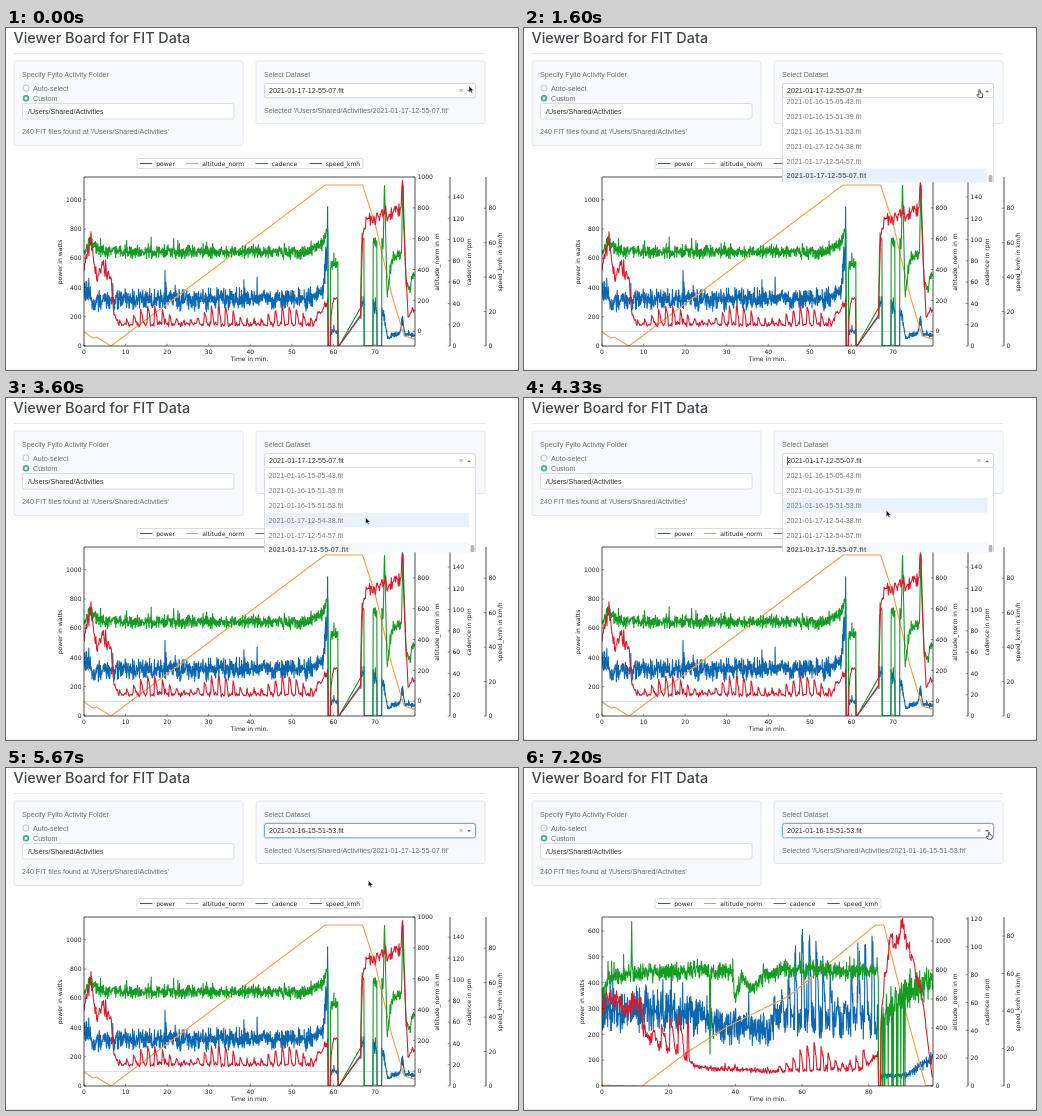
Write an HTML page that moves like this. It is 512x342 px and loops after 7270 ms.

```html
<!DOCTYPE html>
<html lang="en">
<head>
<meta charset="utf-8">
<title>Viewer Board</title>
<style>
html, body { margin: 0; width: 100%; height: 100%; overflow: hidden; background: #fff; }
svg { display: block; width: 512px; height: 342px; }
text { font: 7.12px "Liberation Sans", Arial, sans-serif; fill: #6b6f75; white-space: pre; }
.title { font: 500 14.4px Inter, sans-serif; fill: #43474c; }
.value { fill: #333; }
.plot text { font: 6.05px "DejaVu Sans", sans-serif; fill: #222; }
.mid { text-anchor: middle; }
.end { text-anchor: end; }
.row { fill: #7c7c7c; }
.picked { font-weight: bold; letter-spacing: .18px; fill: #686c70; }
</style>
</head>
<body>
<svg id="stage" viewBox="0 0 512 342"></svg>
<script>
const LOOP = 7270, OPEN = 1080, PICK = 4600, REDRAW = 6270;
const LEFT = 78, RIGHT = 409, TOP = 149, BASE = 318;
const COLORS = { power: '#0c67b0', altitude_norm: '#fb9b3c', cadence: '#149c23', speed_kmh: '#dc1a2b' };
const LABELS = ['power in watts', 'altitude_norm in m', 'cadence in rpm', 'speed_kmh in km/h'];
const OLD = '2021-01-17-12-55-07.fit', NEW = '2021-01-16-15-51-53.fit';
const FILES = ['2021-01-16-15-05-43.fit', '2021-01-16-15-51-39.fit', NEW,
  '2021-01-17-12-54-38.fit', '2021-01-17-12-54-57.fit', OLD];
const stage = document.getElementById('stage');

function el(tag, attrs, parent = stage, content) {
  const node = document.createElementNS('http://www.w3.org/2000/svg', tag);
  for (const key in attrs) node.setAttribute(key, attrs[key]);
  if (content !== undefined) node.textContent = content;
  return parent.appendChild(node);
}
const text = (x, y, content, cls = '', parent) => el('text', { x, y, class: cls }, parent, content);
const box = (x, y, width, height, fill, stroke = 'none', rx = 0, parent) =>
  el('rect', { x, y, width, height, fill, stroke, rx, 'stroke-width': .8 }, parent);
const line = (d, stroke, parent, width = .8) =>
  el('path', { d, stroke, fill: 'none', 'stroke-width': width, 'stroke-linejoin': 'round' }, parent);
const show = (node, on) => node.setAttribute('visibility', on ? 'visible' : 'hidden');
const within = (m, spans = []) => spans.some(([from, to]) => m >= from && m < to);

function random(seed) {
  return () => {
    seed = (seed + 0x6D2B79F5) | 0;
    let v = Math.imul(seed ^ seed >>> 15, 1 | seed);
    v = v + Math.imul(v ^ v >>> 7, 61 | v) ^ v;
    return ((v ^ v >>> 14) >>> 0) / 4294967296;
  };
}

// keys: "minute:value ..." joined by straight lines
function curve(keys) {
  const pts = keys.split(' ').map(k => k.split(':').map(Number));
  return m => {
    const i = Math.max(1, pts.findIndex(p => p[0] > m));
    const [m0, v0] = pts[i - 1], [m1, v1] = pts[i];
    return v0 + (v1 - v0) * (m - m0) / (m1 - m0);
  };
}

// Short efforts of uneven height, each fading over its width
function effort(m, { from, to, gap, width, height }) {
  const n = Math.floor((m - from) / gap), phase = (m - from) % gap;
  if (m < from || m > to || phase > width) return 0;
  return height * (.2 + .8 * Math.sin(n * 12.9) ** 2) * Math.sqrt(1 - phase / width);
}

// Scatter grows with the value; calm rescales it once the climb is over
function trace(ride, name, scale) {
  const { keys, noise = 0, calm = 1, step = .3, efforts = [], drops } = ride[name];
  const value = curve(keys), rnd = random(name.length * 7 + ride.minutes);
  const pedalled = name === 'power' || name === 'cadence';
  let d = '';
  for (let m = 0; m < ride.minutes; m += step / ride.pace) {
    if (within(m, ride.gaps)) continue;
    let v = value(m);
    if (noise) {
      const amp = v * noise * (m > ride.summit ? calm : 1);
      v += (rnd() + rnd() - 1) * amp * 1.25;
      if (rnd() < .025) v += amp * (.6 + 1.4 * rnd());
      for (const e of efforts) v += effort(m, e);
      const idle = pedalled && within(m, ride.coasts) || drops && within(m, [drops]) && rnd() < .1;
      if (idle || within(m, ride.stops)) v = 0;
    }
    const y = Math.min(BASE, scale.zero - v * scale.unit);
    d += `${d ? 'L' : 'M'}${(LEFT + m * ride.pace).toFixed(2)} ${y.toFixed(2)}`;
  }
  return d;
}

const axis = (step, max, unit, zero = BASE) => ({ step, max, unit, zero });

const longClimb = {
  pace: 4.157, minutes: 79.6, tick: 10, wattsX: 56, summit: 58.5,
  axes: [axis(200, 1000, .1463), axis(200, 1000, .1542, 303.2), axis(20, 140, 1.064), axis(20, 80, 1.722)],
  stops: [[58.7, 59.3], [61.1, 61.35]], gaps: [[61.35, 66.5]], coasts: [[67.4, 69.5], [70.5, 71.6]],
  power: { noise: .22,
    keys: '0:350 1:390 2:300 7:320 55:320 57.5:390 58.6:700 59.3:100 61:100 66.5:190 67:320 72:240 73:60 76:90 76.7:200 77.2:75 80:75' },
  altitude_norm: { keys: '0:-5 2.2:-45 3:-38 6.5:-96 58:948 67:948 70:700 74:240 77:-30 80:-57' },
  cadence: { noise: .065,
    keys: '0:90 1.2:97 4:89 54:88 57.5:96 58.6:112 59.3:78 61:77 66.5:26 66.8:100 72:97 72.3:152 72.9:45 74:80 76.4:88 76.7:152 77.5:60 78.5:52 79:68 80:64' },
  speed_kmh: { noise: .1, calm: .55, step: .7,
    efforts: [{ from: 8.5, to: 57, gap: 1.7, width: .6, height: 11 }],
    keys: '0:42 1.5:62 3:39 4.5:47 6.5:40 7.2:18 8.5:12.5 55:12.5 58.6:26 59.3:15 60:27 61.1:27 66.5:16 67:66 68:74 76:79 76.6:94 77.1:58 78:16 79:22 80:17' }
};
const intervals = {
  pace: 3.335, minutes: 99.2, tick: 20, wattsX: 60, summit: 83,
  axes: [axis(100, 600, .2583), axis(200, 1000, .145), axis(20, 120, 1.392), axis(20, 80, 1.875)],
  stops: [[82.9, 83.6]],
  power: { noise: .26,
    efforts: [{ from: 51.5, to: 82, gap: 2.1, width: .8, height: 360 }],
    keys: '0:285 12:295 28:280 33:240 50:215 52:255 83:255 83.6:40 91:40 100:115' },
  altitude_norm: { keys: '0:5 12:0 26:240 38:415 56:620 82:1110 84.5:1110 88.5:745 92:430 97:5 100:0' },
  cadence: { noise: .075, calm: 2.2, drops: [84, 91],
    keys: '0:66 2:78 8.7:81 8.9:116 9.1:81 32.2:83 32.4:18 32.6:82 39:82 40:64 42:79 45:70 48:78 54:84 82.9:82 83.6:45 90:66 100:74' },
  speed_kmh: { noise: .15, calm: .4, step: .5,
    efforts: [{ from: 12.5, to: 26, gap: 2.6, width: 1.6, height: 22 }, { from: 53, to: 80, gap: 2.1, width: .9, height: 15 }],
    keys: '0:40 2:48 6:42 12:42 12.5:26 20:19 26:14 28:10 50:8 78:9 83:17 84:44 86.5:80 88:75 90:85 93:68 96:48 99:5 100:0' }
};

function chart(ride) {
  const g = el('g', { class: 'plot' });
  const lines = el('g', { 'clip-path': 'url(#area)' }, g);
  const ground = ride.axes[1].zero;
  if (ground < BASE) line(`M${LEFT} ${ground + .3}H${RIGHT}`, '#fccb9c', lines);
  Object.keys(COLORS).forEach((name, i) => line(trace(ride, name, ride.axes[i]), COLORS[name], lines, 1.1));

  line(`M${LEFT} ${TOP}H${RIGHT}V${BASE}H${LEFT}ZM444 ${TOP}V${BASE}M480 ${TOP}V${BASE}`, '#222', g);
  for (let m = 0; m < ride.minutes - 1; m += ride.tick) {
    const x = LEFT + m * ride.pace;
    line(`M${x} ${BASE}v-2.2`, '#222', g, .5);
    text(x, 326, m, 'mid', g);
  }
  [LEFT, RIGHT, 444, 480].forEach((x, i) => {
    const { step, max, unit, zero } = ride.axes[i], side = i ? 1 : -1;
    for (let v = 0; v <= max; v += step) {
      const y = zero - v * unit;
      line(`M${x} ${y}h${-2.2 * side}`, '#222', g, .5);
      text(x + 2.5 * side, y + 2.2, v, i ? '' : 'end', g);
    }
  });
  [ride.wattsX, 432.5, 465, 496].forEach((x, i) =>
    el('text', { transform: `translate(${x} 234) rotate(-90)`, class: 'mid' }, g, LABELS[i]));
  text(243.5, 332.5, 'Time in min.', 'mid', g);
  return g;
}

// page
const defs = el('defs', {});
const clip = (id, x, y, width, height) => el('rect', { x, y, width, height }, el('clipPath', { id }, defs));
clip('area', LEFT, TOP, RIGHT - LEFT, BASE - TOP);
clip('window', 258, 70, 212, 84.3);
text(7.5, 15, 'Viewer Board for FIT Data', 'title');
line('M8 25.5H479', '#e2e4e7');
line('M0 341.5H512', '#ececee');
box(8, 33, 229, 84.5, '#f8f9fc', '#dfe2e9', 2);
box(250, 33, 229, 62.5, '#f8f9fc', '#dfe2e9', 2);
text(16, 49, 'Specify Fylto Activity Folder');
el('circle', { cx: 20, cy: 60, r: 3.1, fill: '#fff', stroke: '#a9adb2', 'stroke-width': .7 });
el('circle', { cx: 20, cy: 70.3, r: 2.4, fill: '#fff', stroke: '#45b08c', 'stroke-width': 1.8 });
text(27, 62.6, 'Auto-select');
text(27, 72.9, 'Custom');
box(16.5, 75.5, 211.5, 15.5, '#fff', '#d3d6dc', 2);
text(22, 86, '/Users/Shared/Activities', 'value');
text(16, 105.6, "240 FIT files found at '/Users/Shared/Activities'");
text(258, 49, 'Select Dataset');
const status = text(258, 85, '');

// chart
const charts = [chart(longClimb), chart(intervals)];
const legend = el('g', { class: 'plot' });
box(131, 130.5, 226, 10, '#fff', '#d4d4d4', 1.5, legend);
const slots = [134, 180, 249.5, 303.5];
Object.keys(COLORS).forEach((name, i) => {
  line(`M${slots[i]} 135.5h12.3`, COLORS[name], legend, 1.1);
  text(slots[i] + 16.2, 137.5, name, '', legend);
});

// dropdown
const glow = box(257.2, 54.2, 213.6, 16.6, '#d5e8f5', 'none', 2.5);
const field = box(258.5, 55.5, 211, 14.3, '#fff', '#cccccc', 2);
const value = text(263, 65.2, '', 'value');
const caret = line('M263.6 58.6v8.2', '#222');
text(453, 65.3, '×').style.fill = '#888';
const arrow = el('path', { fill: '#777' });
const list = el('g', { 'clip-path': 'url(#window)' });
box(258.5, 69.5, 211, 84.6, '#fff', '#d4d4d4', 0, list);
const PITCH = 14.85, ROW0 = 77.6;
const rows = el('g', {}, list);
const marks = FILES.map((name, i) => {
  const y = ROW0 + i * PITCH;
  const mark = box(259, y - PITCH / 2, 204.5, PITCH, '#fff', 'none', 0, rows);
  text(262.5, y + 2.6, name, name === OLD ? 'picked' : 'row', rows);
  return mark;
});
box(464.6, 147, 3.8, 7, '#b4b4b4', 'none', 1.5, list);

// pointer
const pointer = el('g', {});
const arrowTip = el('path', { d: 'M0 0V6.6L1.5 5.2L2.6 7.6L3.7 7.1L2.7 4.8H4.7Z',
  fill: '#111', stroke: '#fff', 'stroke-width': .5 }, pointer);
const hand = el('path', { d: 'M-.7 .6Q0 -.5 .7 .6V2.9L2.6 3.3Q3.4 3.6 3.3 4.6L2.8 7.4H-.9L-2.6 5Q-2.6 4 -1.8 4.4L-.7 5.2Z',
  fill: '#fff', stroke: '#333', 'stroke-width': .8 }, pointer);
const MOVES = [[200, 900, 455.5, 62], [1640, 2220, 359.5, 119.2], [3800, 4350, 362.3, 112.2], [6680, 7130, 465, 63.8]];

function pointerAt(t) {
  let x = 463, y = 57.8;
  for (const [from, to, x1, y1] of MOVES) {
    const k = Math.min(1, Math.max(0, (t - from) / (to - from))), e = k * k * (3 - 2 * k);
    x += (x1 - x) * e;
    y += (y1 - y) * e;
  }
  return [x, y];
}

function draw(t) {
  const open = t >= OPEN && t < PICK, picked = t >= PICK, redrawn = t >= REDRAW;
  const [x, y] = pointerAt(t);
  const overArrow = t > 250 && x > 450 && y < 70;
  pointer.setAttribute('transform', `translate(${x.toFixed(2)} ${y.toFixed(2)})`);
  show(arrowTip, !overArrow);
  show(hand, overArrow);

  show(charts[0], !redrawn);
  show(charts[1], redrawn);
  status.textContent = `Selected '/Users/Shared/Activities/${redrawn ? NEW : OLD}'`;

  show(glow, picked);
  field.setAttribute('stroke', picked ? '#4a9fd6' : '#cccccc');
  value.textContent = picked ? NEW : OLD;
  show(caret, open && (t - OPEN) % 1000 < 500);
  arrow.setAttribute('d', open ? 'M461 64.2h4.2l-2.1 -2.3z' : 'M461 62h4.2l-2.1 2.3z');

  show(list, open);
  const scroll = 4 * Math.min(1, Math.max(0, (2100 - t) / 150));
  rows.setAttribute('transform', `translate(0 ${-scroll})`);
  const hover = y > 70 ? Math.floor((y + scroll - ROW0) / PITCH + .5) : FILES.length - 1;
  marks.forEach((mark, i) =>
    mark.setAttribute('fill', i === hover ? '#e8f2fc' : FILES[i] === OLD ? '#f5faff' : '#fff'));
}

const start = performance.now();
function tick() {
  draw((performance.now() - start) % LOOP);
  requestAnimationFrame(tick);
}
tick();
</script>
</body>
</html>
```
